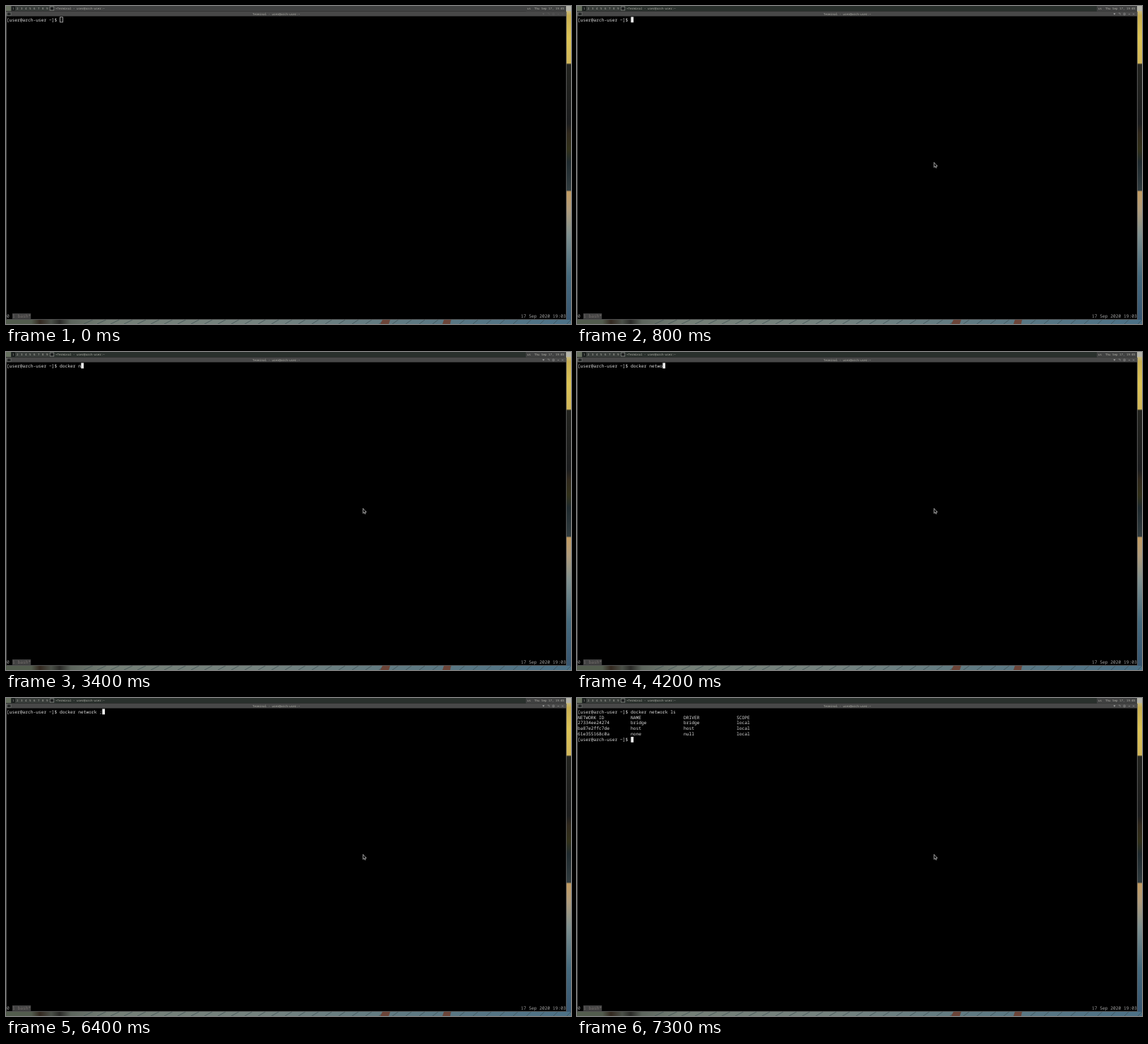
An HTML page for the animation above (8 s loop, 800 px wide and 450 px high).

```html
<!DOCTYPE html>
<html lang="en">
<head>
<meta charset="utf-8">
<title>Terminal</title>
<style>
  html, body { margin: 0; width: 100%; height: 100%; overflow: hidden; background: #000; }
  svg { display: block; width: 800px; height: 450px; }
  text {
    font: 6.25px "Noto Sans Mono", "DejaVu Sans Mono", monospace;
    fill: #dedede; white-space: pre; text-rendering: geometricPrecision;
  }
  .small text { font-size: 4.167px; fill: #b4b4ac; }
  text.status { fill: #a4a4a4; }
</style>
</head>
<body>
<svg viewBox="0 0 800 450">
  <defs>
    <linearGradient id="side" x1="0" y1="0" x2="0" y2="1">
      <stop offset="0" stop-color="#c8c6b4"/>
      <stop offset=".03" stop-color="#c9b052"/>
      <stop offset=".1" stop-color="#dcc455"/>
      <stop offset=".179" stop-color="#d2b75a"/>
      <stop offset=".184" stop-color="#23241f"/>
      <stop offset=".37" stop-color="#1c1d1e"/>
      <stop offset=".4" stop-color="#30281c"/>
      <stop offset=".45" stop-color="#323119"/>
      <stop offset=".49" stop-color="#1f2a2e"/>
      <stop offset=".579" stop-color="#303b3e"/>
      <stop offset=".584" stop-color="#c39c62"/>
      <stop offset=".64" stop-color="#b09c7c"/>
      <stop offset=".72" stop-color="#7f908f"/>
      <stop offset=".85" stop-color="#456a7d"/>
      <stop offset="1" stop-color="#365470"/>
    </linearGradient>
    <linearGradient id="floor">
      <stop offset="0" stop-color="#525c4d"/>
      <stop offset=".045" stop-color="#525c4d"/>
      <stop offset=".06" stop-color="#33281f"/>
      <stop offset=".08" stop-color="#4a5048"/>
      <stop offset=".095" stop-color="#2a2a27"/>
      <stop offset=".115" stop-color="#5c655c"/>
      <stop offset=".18" stop-color="#747f76"/>
      <stop offset=".45" stop-color="#75837f"/>
      <stop offset=".7" stop-color="#5f7a82"/>
      <stop offset="1" stop-color="#4b7187"/>
    </linearGradient>
  </defs>

  <rect width="800" height="450" fill="#000"/>
  <rect x="793" width="7" height="450" fill="url(#side)"/>
  <rect y="444" width="800" height="6" fill="url(#floor)"/>
  <g id="planks" stroke="#3a4b50" stroke-width=".7"></g>
  <path d="M530 450l3-6h11l-2 6zM618 450l2-6h10l-1 6z" fill="#6b4438"/>

  <rect id="panel" width="793" height="7.5"/>
  <rect x="736" width="57" height="7.5" fill="#404141"/>
  <rect y="7.5" width="793" height="7" fill="#484848"/>
  <path d="M.4 8V443.6H793.4V8" fill="none" stroke="#626262" stroke-width=".9"/>

  <g class="small">
    <rect x="13" width="48" height="7" fill="#383d3a"/>
    <rect width="7" height="7" fill="#66705f"/>
    <rect x="8" y=".5" width="5" height="6" fill="#171b1a"/>
    <g id="pager"></g>
    <rect x="62.2" y="1" width="5.6" height="5" fill="#1c1e1e" stroke="#9a9e98" stroke-width=".7"/>
    <text id="taskName" x="70" y="5"></text>
    <text x="738" y="5">us</text>
    <text x="748" y="5">Thu Sep 17, 19:03</text>
    <rect x="793" width="7" height="7" fill="#b4b4aa"/>
    <rect x="1.5" y="9" width="5.5" height="4.5" fill="#232525" stroke="#7d807c" stroke-width=".6"/>
    <text id="title" x="349" y="13"></text>
    <g id="buttons" fill="none" stroke="#a0a0a0" stroke-width=".6">
      <path d="M759.9 10.5h2.2l-1.1 1.7z" fill="#a0a0a0"/>
      <path d="M766.7 10.2h2.4v2.4M774 10.2h2.2v2.4h-2.2zM780.8 11.5h2.4M787.1 10.4l2 2m0-2l-2 2"/>
    </g>
  </g>

  <g id="screen"></g>
  <rect id="cursor"/>

  <rect x="9" y="435" width="26.2" height="7.9" fill="#424242"/>
  <text class="status" x="1" y="441.2">0</text>
  <text x="9" y="441.2" style="fill:#77706e">1 bash*</text>
  <text class="status" x="729" y="441.2">17 Sep 2020 19:03</text>

  <path id="pointer" d="M505.5 221.3v7l1.6-1.4 1 2.3 1.1-.5-1-2.2h2.1z" fill="#111" stroke="#ccc" stroke-width=".7"/>
</svg>

<script>
const LOOP = 8000, CELL = 3.75, LINE = 7.9;
const FOCUS_AT = 100, ENTER_AT = 7200, RESULT_AT = 7300;
const HOST = "user@arch-user";
const PROMPT = `[${HOST} ~]$ `;

// Each key press: time and text; "<" is a backspace.
const KEYS = [
  [1400, "d"], [1800, "o"], [2200, "k"], [2500, "<"], [2600, "c"],
  [2800, "k"], [2900, "e"], [3000, "r"], [3200, " "], [3400, "n"],
  [3600, "e"], [3700, "t"], [3900, "w"], [4200, "o"], [5200, "rk "],
  [5900, ";"], [6100, "s"], [6400, "<"], [6600, "<"], [6700, "l"], [6900, "s"]
];

const row = (...cells) => cells.map(c => c.padEnd(20)).join("").trimEnd();
const RESULT = [
  row("NETWORK ID", "NAME", "DRIVER", "SCOPE"),
  row("27334ee24274", "bridge", "bridge", "local"),
  row("ba87e2ffc7de", "host", "host", "local"),
  row("61e355168c0a", "none", "null", "local"),
  PROMPT
];

const $ = id => document.getElementById(id);

function set(el, attrs) {
  for (const name in attrs) el.setAttribute(name, attrs[name]);
}

function add(parent, tag, attrs, content = "") {
  const el = document.createElementNS("http://www.w3.org/2000/svg", tag);
  set(el, attrs);
  el.textContent = content;
  return parent.appendChild(el);
}

for (let n = 1; n <= 9; n++) add($("pager"), "text", { x: 3 + n * 6, y: 5 }, n);
for (let x = 110; x < 800; x += 19) {
  add($("planks"), "path", { d: `M${x} 450l${14 - x / 100} -6` });
}
$("title").textContent = `Terminal - ${HOST}:~`;
$("taskName").textContent = `▪Terminal - ${HOST}:~`;

const lines = Array.from({ length: 6 }, (_, i) =>
  add($("screen"), "text", { x: 1, y: 21.6 + i * LINE }));

function commandAt(t) {
  return KEYS.filter(([at]) => at <= t)
    .reduce((typed, [, key]) => key === "<" ? typed.slice(0, -1) : typed + key, "");
}

function screenAt(t) {
  const shown = [PROMPT + commandAt(t)];
  if (t >= RESULT_AT) shown.push(...RESULT);
  else if (t >= ENTER_AT) shown.push("");
  return shown;
}

function render(t) {
  const focused = t >= FOCUS_AT;
  const shown = screenAt(t);
  lines.forEach((line, i) => { line.textContent = shown[i] || ""; });

  const last = shown.length - 1;
  const x = 1.3 + shown[last].length * CELL, y = 15.4 + last * LINE;
  set($("cursor"), focused
    ? { x, y, width: CELL, height: LINE, fill: "#eee", stroke: "none" }
    : { x: x + .3, y: y + .4, width: CELL, height: LINE - .8, fill: "none", stroke: "#ccc", "stroke-width": .8 });

  $("panel").setAttribute("fill", focused ? "#29302c" : "#404141");
  $("buttons").setAttribute("opacity", focused ? 1 : .2);
  $("pointer").setAttribute("visibility", focused ? "visible" : "hidden");
}

const start = performance.now();
function frame() {
  render((performance.now() - start) % LOOP);
  requestAnimationFrame(frame);
}
frame();
</script>
</body>
</html>
```
